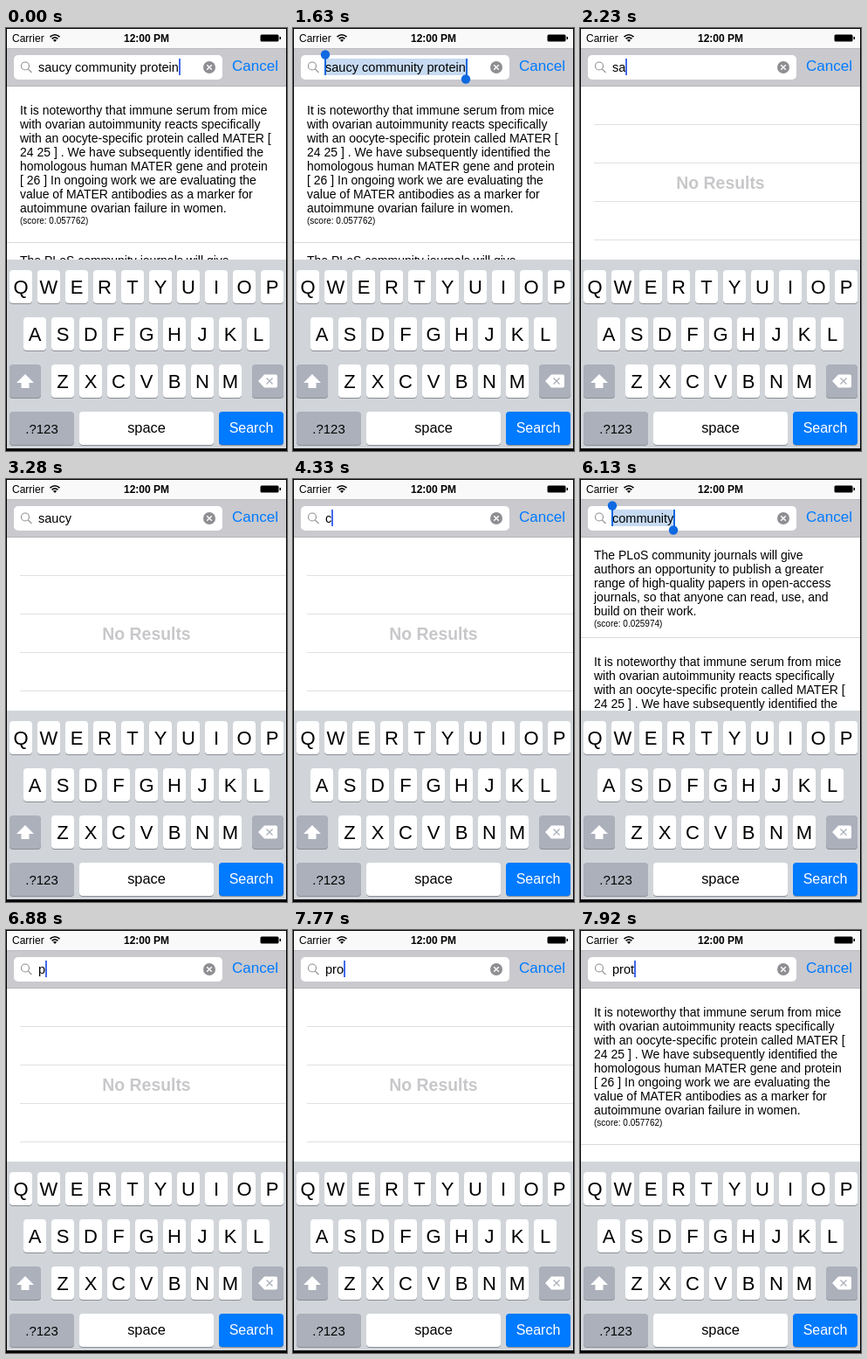
These frames come from a looping animation (322x484 px, 8000 ms). An HTML page with a canvas:

```html
<!DOCTYPE html>
<html lang="en">
<head>
<meta charset="utf-8">
<title>Search as you type</title>
<style>
  html, body { margin: 0; width: 322px; height: 484px; overflow: hidden; background: #000; }
  canvas { display: block; }
</style>
</head>
<body>
<canvas id="stage" width="322" height="484"></canvas>
<script>
const ctx = document.getElementById('stage').getContext('2d');
const LOOP = 8000;
const FONT = '"Liberation Sans", Arial, sans-serif';
const BLUE = '#007aff', GRAY_KEY = '#abb0bb', HANDLE = '#0f69e0';

const immune = {
  pad: 32, height: 178.5, score: '0.057762',
  lines: [
    'It is noteworthy that immune serum from mice',
    'with ovarian autoimmunity reacts specifically',
    'with an oocyte-specific protein called MATER [',
    '24 25 ] . We have subsequently identified the',
    'homologous human MATER gene and protein',
    '[ 26 ] In ongoing work we are evaluating the',
    'value of MATER antibodies as a marker for',
    'autoimmune ovarian failure in women.'
  ]
};
const journals = {
  pad: 25, height: 114.5, score: '0.025974',
  lines: [
    'The PLoS community journals will give',
    'authors an opportunity to publish a greater',
    'range of high-quality papers in open-access',
    'journals, so that anyone can read, use, and',
    'build on their work.'
  ]
};

const FULL = 'saucy community protein';
const both = [immune, journals], swapped = [journals, immune], none = [];

// [start ms, query, results, caret opacity or 'sel' for selected text]
const steps = [
  [0, FULL, both, 1], [440, FULL, both, .5], [590, FULL, both, 0],
  [890, FULL, both, .5], [1040, FULL, both, 1], [1490, FULL, both, .5],
  [1630, FULL, both, 'sel'],
  [2230, 'sa', none, 1], [2380, 'sauc', none, 1], [2530, 'saucy', none, 1],
  [3130, 'saucy', none, .5], [3280, 'saucy', none, 0], [3580, 'saucy', none, 'sel'],
  [4330, 'c', none, 1], [4480, 'com', none, 1], [4630, 'comm', swapped, 1],
  [4930, 'commun', swapped, 1], [5080, 'communi', swapped, 1], [5230, 'community', swapped, 1],
  [5830, 'community', swapped, .5], [5980, 'community', swapped, 0],
  [6130, 'community', swapped, 'sel'],
  [6880, 'p', none, 1], [7030, 'pr', none, 1], [7470, 'pro', none, 1],
  [7920, 'prot', [immune], 1]
];

function rect(x, y, w, h, color) {
  ctx.fillStyle = color;
  ctx.fillRect(x, y, w, h);
}

function round(x, y, w, h, r, color) {
  ctx.fillStyle = color;
  ctx.beginPath();
  ctx.roundRect(x, y, w, h, r);
  ctx.fill();
}

function dot(x, y, r, color) {
  ctx.fillStyle = color;
  ctx.beginPath();
  ctx.arc(x, y, r, 0, 7);
  ctx.fill();
}

function text(str, x, y, size, color = '#000', align = 'left', weight = '') {
  ctx.font = `${weight} ${size}px ${FONT}`;
  ctx.textAlign = align;
  ctx.fillStyle = color;
  ctx.fillText(str, x, y);
}

function stroke(path, color, width) {
  ctx.strokeStyle = color;
  ctx.lineWidth = width;
  ctx.stroke(new Path2D(path));
}

function fill(path, color) {
  ctx.fillStyle = color;
  ctx.fill(new Path2D(path));
}

function statusBar() {
  rect(1, 1, 320, 22, '#f9f9f9');
  text('Carrier', 7, 16, 12);
  stroke('M50.5 10.2Q56 5.3 61.5 10.2M52.6 12.4Q56 9.3 59.4 12.4', '#000', 1.6);
  fill('M56 16L53.9 13.8Q56 12 58.1 13.8Z', '#000');
  text('12:00 PM', 161, 16, 12, '#000', 'center', 'bold');
  round(291.5, 7.5, 21, 8, 1.5, '#000');
  rect(313.5, 10, 1.5, 3, '#000');
}

function searchBar(query, caret) {
  rect(1, 23, 320, 44, '#c9c9ce');
  rect(1, 23, 320, 1, '#bcbcc1');
  rect(1, 66, 320, 1, '#b4b4b9');
  round(9, 31, 239, 28, 5, '#fff');
  stroke('M26.5 43.5A4.5 4.5 0 1 1 17.5 43.5A4.5 4.5 0 1 1 26.5 43.5M25.2 46.8L29.5 51', '#8e8e93', 1.1);
  dot(233, 45, 7, '#8e8e93');
  stroke('M230.2 42.2l5.6 5.6M235.8 42.2l-5.6 5.6', '#fff', 1.4);
  text('Cancel', 259, 49, 17, BLUE);

  const size = 14.55;
  ctx.font = `${size}px ${FONT}`;
  const end = 37 + Math.round(ctx.measureText(query).width);
  const selected = caret === 'sel';
  if (selected) rect(37, 35, end - 37, 19, '#c6daf1');
  text(query, 37, 50, size);
  if (selected) {
    rect(36, 34, 2, 20, HANDLE);
    rect(end, 35, 2, 20, HANDLE);
    dot(37, 30.5, 5.2, HANDLE);
    dot(end, 58.5, 5.2, HANDLE);
  } else {
    ctx.globalAlpha = caret;
    rect(end, 35, 2, 19, '#4269ee');
    ctx.globalAlpha = 1;
  }
}

function resultList(results) {
  rect(1, 67, 320, 198, '#fff');
  if (!results.length) {
    for (let y = 110; y < 265; y += 44) rect(16, y, 305, 1, '#e0e0e2');
    text('No Results', 161, 184, 19.4, '#c8c8cb', 'center', 'bold');
  }
  let top = 67;
  for (const { pad, height, score, lines } of results) {
    lines.forEach((line, i) => text(line, 16, Math.round(top + pad) + i * 16, 14));
    text(`(score: ${score})`, 16, Math.round(top + pad) + lines.length * 16 - 3, 10);
    top += height;
    rect(1, Math.floor(top), 320, 1, '#d9d9db');
  }
}

function key(x, y, w, color = '#fff') {
  round(x, y + 1, w, 38, 4, '#8b8e94');
  round(x, y, w, 38, 4, color);
}

function keyboard() {
  rect(1, 265, 320, 216, '#d1d5da');
  [['QWERTYUIOP', 4], ['ASDFGHJKL', 20], ['ZXCVBNM', 52]].forEach(([row, x0], r) => {
    [...row].forEach((letter, i) => {
      const x = x0 + i * 32, y = 277 + r * 54;
      key(x, y, 26);
      text(letter, x + 13, y + 27, 22, '#000', 'center');
    });
  });
  key(4, 385, 36, GRAY_KEY);
  fill('M22 396L32 406H26.5V412H17.5V406H12Z', '#fff');
  key(282, 385, 36, GRAY_KEY);
  fill('M289 404L296 396.5H309Q311 396.5 311 398.5V409.5Q311 411.5 309 411.5H296Z', '#fff');
  stroke('M298.5 400.5l7 7M305.5 400.5l-7 7', GRAY_KEY, 1.4);
  key(4, 439, 74, GRAY_KEY);
  text('.?123', 41, 464, 15, '#000', 'center');
  key(84, 439, 154);
  text('space', 161, 463, 16.4, '#000', 'center');
  key(244, 439, 74, BLUE);
  text('Search', 281, 463, 16, '#fff', 'center');
}

function frame(now) {
  const t = now % LOOP;
  const [, query, results, caret] = steps.findLast(step => step[0] <= t);
  rect(0, 0, 322, 484, '#000');
  resultList(results);
  statusBar();
  searchBar(query, caret);
  keyboard();
  requestAnimationFrame(frame);
}
frame(0);
</script>
</body>
</html>
```
